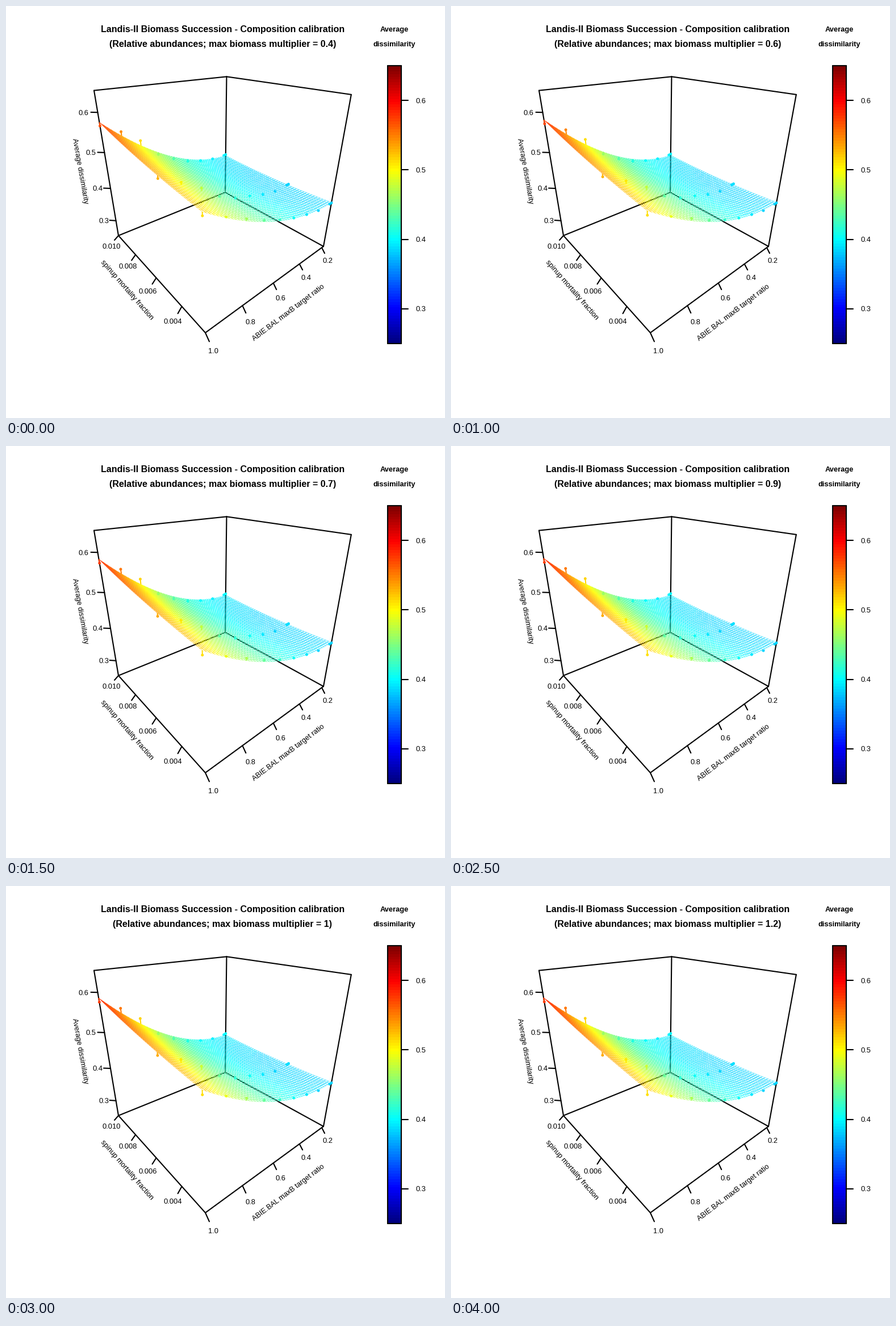
A matplotlib script that plays this animation: 773 px wide and 725 px high, repeating every 4.5 s.

```python
import numpy as np
import matplotlib.pyplot as plt
from matplotlib.animation import FuncAnimation
from matplotlib.collections import LineCollection, PolyCollection
from matplotlib.colors import LinearSegmentedColormap

W, H, DPI = 773, 725, 64
PT = 72 / DPI  # points per pixel
ZMIN, ZMAX = 0.25, 0.65

plt.rcParams["font.family"] = "Liberation Sans"
jet = LinearSegmentedColormap.from_list(
    "jet100",
    ["#00007F", "#0000FF", "#007FFF", "#00FFFF", "#7FFF7F",
     "#FFFF00", "#FF7F00", "#FF0000", "#7F0000"], N=100)

fig = plt.figure(figsize=(W / DPI, H / DPI), dpi=DPI, facecolor="white")
ax = fig.add_axes([0, 0, 1, 1])
ax.axis("off")


def project(u, v, z):
    """Perspective view: u runs along the ratio axis, v along mortality."""
    w = (z - ZMIN) / (ZMAX - ZMIN)
    d = 1 + 0.4118 * u + 0.4853 * v - 0.2935 * w
    x = (351 + 438.2 * u - 56.9 * v - 109.4 * w) / d
    y = (575 + 22.2 * u + 25.06 * v - 422.9 * w) / d
    return np.stack([x, y], axis=-1)


def shade(z):
    return jet((np.asarray(z) - ZMIN) / (ZMAX - ZMIN))


def line(p, q):
    ax.plot([p[0], q[0]], [p[1], q[1]], color="black", lw=2.1 * PT,
            solid_capstyle="round", zorder=1)


def label(x, y, s, size=12.9, **kw):
    kw = {"ha": "center", "va": "baseline", **kw}
    return ax.text(x, y, s, fontsize=size * PT, color="black", zorder=6, **kw)


# Box edges
edges = [((0, 0, 0), (0, 1, 0)), ((0, 0, 0), (1, 0, 0)),
         ((0, 1, 0), (1, 1, 0)), ((1, 0, 0), (1, 1, 0)),
         ((0, 1, 0), (0, 1, 1)), ((1, 1, 0), (1, 1, 1)),
         ((1, 0, 0), (1, 0, 1)), ((0, 1, 1), (1, 1, 1)),
         ((1, 1, 1), (1, 0, 1))]
for a, b in edges:
    line(*[project(u, v, ZMAX if top else ZMIN) for u, v, top in (a, b)])

# Axis ticks: text, label centre, tick offset
ratio = [("1.0", 365, 606.5, 7, 15.5), ("0.8", 430, 556, 6, 13),
         ("0.6", 483, 514, 5.5, 11.5), ("0.4", 528, 478, 5.5, 10.5),
         ("0.2", 567, 448, 5, 10)]
mortality = [("0.004", 293.5, 555, -7, 12.5), ("0.006", 249.8, 502, -7, 11),
             ("0.008", 215, 458, -7, 10), ("0.010", 185.5, 423, -7, 8)]
height = [("0.3", 172.5, 378, -11, -0.7), ("0.4", 161.3, 321, -12, -0.5),
          ("0.5", 149.8, 258, -12, -0.4), ("0.6", 136.3, 187.5, -12, -0.3)]
for ticks, place in [
        (ratio, lambda t: project((1 - t) * 1.225, 0, ZMIN)),
        (mortality, lambda t: project(0, (t - 0.0025) / 0.0075, ZMIN)),
        (height, lambda t: project(0, 1, t))]:
    for s, x, y, dx, dy in ticks:
        start = place(float(s))
        line(start, start + [dx, dy])
        label(x, y + 4.4, s)

for x, y, s, angle in [(129.8, 290.5, "Average dissimilarity", -80),
                       (213.2, 499.7, "spinup mortality fraction", -49),
                       (497.8, 539.7, "ABIE.BAL maxB target ratio", 37.3)]:
    label(x, y, s, size=12.8, rotation=angle, rotation_mode="anchor",
          va="center")

# Colour key
TOP, BOTTOM, LEFT, RIGHT = 105.4, 593.6, 672, 696
ax.imshow(np.linspace(1, 0, 100)[:, None], cmap=jet, aspect="auto",
          extent=(LEFT, RIGHT, BOTTOM, TOP), interpolation="nearest", zorder=1)
corners = [(LEFT, TOP), (RIGHT, TOP), (RIGHT, BOTTOM), (LEFT, BOTTOM)]
for p, q in zip(corners, corners[1:] + corners[:1]):
    line(p, q)
for t in (0.3, 0.4, 0.5, 0.6):
    y = BOTTOM - (t - ZMIN) / (ZMAX - ZMIN) * (BOTTOM - TOP)
    line((RIGHT, y), (RIGHT + 12, y))
    label(730.3, y + 4.8, f"{t}")
label(684.2, 45.2, "Average", weight="bold")
label(684.2, 71.2, "dissimilarity", weight="bold")

label(381.8, 46.3, "Landis-II Biomass Succession - Composition calibration",
      16, weight="bold")
title = label(381.5, 72.3, "", 16, weight="bold")

# Measured values for mortality 0.010, 0.005 and 0.0025
cols = np.append(np.arange(9) * 0.1225, 1.0)
rows = np.array([1, 1 / 3, 0])
base = np.array([
    [.5676, .5440, .5100, .4590, .4326, .4126, .4016, .3949, .3946, .3958],
    [.5264, .5033, .4744, .4367, .4146, .4033, .3902, .3826, .3855, .3856],
    [.5117, .4893, .4653, .4410, .4214, .4049, .3936, .3847, .3842, .3844],
]).ravel()
pu, pv = (a.ravel() for a in np.meshgrid(cols, rows))
bump = np.exp(-(pu / 0.32) ** 3)
gain = np.sqrt(pv) * (0.008 * bump + 0.004 * pu ** 12) + 0.002 * bump


def terms(u, v):
    return np.stack([np.ones_like(u), u, v, u * u, u * v, v * v, u * u * v],
                    axis=-1)


side = np.linspace(1, 0, 50)
gu, gv = np.meshgrid(side, side)
fit_terms, grid_terms = terms(pu, pv), terms(gu, gv)
# The extra row shrinks the cubic term of the fitted surface
shrunk_terms = np.vstack([fit_terms, [0, 0, 0, 0, 0, 0, 0.19]])


def cells(a):
    """Four corners of every grid cell, far cells first."""
    quad = np.stack([a[:-1, :-1], a[:-1, 1:], a[1:, 1:], a[1:, :-1]], axis=2)
    return quad.reshape(-1, 4, *a.shape[2:])


mesh = PolyCollection([], facecolors="none", linewidths=0.45 * PT, zorder=3)
stems = LineCollection([], linewidths=2 * PT, zorder=4)
ax.add_collection(mesh)
ax.add_collection(stems)
dots = ax.scatter([], [], s=(4.9 * PT) ** 2, linewidths=0, zorder=4)
ax.set_xlim(0, W)
ax.set_ylim(H, 0)


def draw(i):
    m = 0.4 + 0.1 * i
    title.set_text(f"(Relative abundances; max biomass multiplier = {m:.2g})")

    rise = (1 - np.exp(-(m - 0.4) / 0.3)) / (1 - np.exp(-0.8 / 0.3))
    z = base + gain * rise
    coef = np.linalg.lstsq(shrunk_terms, np.append(z, 0), rcond=None)[0]

    surface = grid_terms @ coef
    mesh.set_verts(cells(project(gu, gv, surface)))
    mesh.set_edgecolor(shade(cells(surface).mean(axis=1)))

    tips = project(pu, pv, z)
    feet = project(pu, pv, fit_terms @ coef)
    stems.set_segments(np.stack([tips, feet], axis=1))
    stems.set_color(shade(z))
    dots.set_offsets(tips)
    dots.set_facecolor(shade(z))
    return mesh, stems, dots, title


anim = FuncAnimation(fig, draw, frames=9, init_func=lambda: draw(0),
                     interval=500, repeat=True, blit=False)
plt.show()
```
